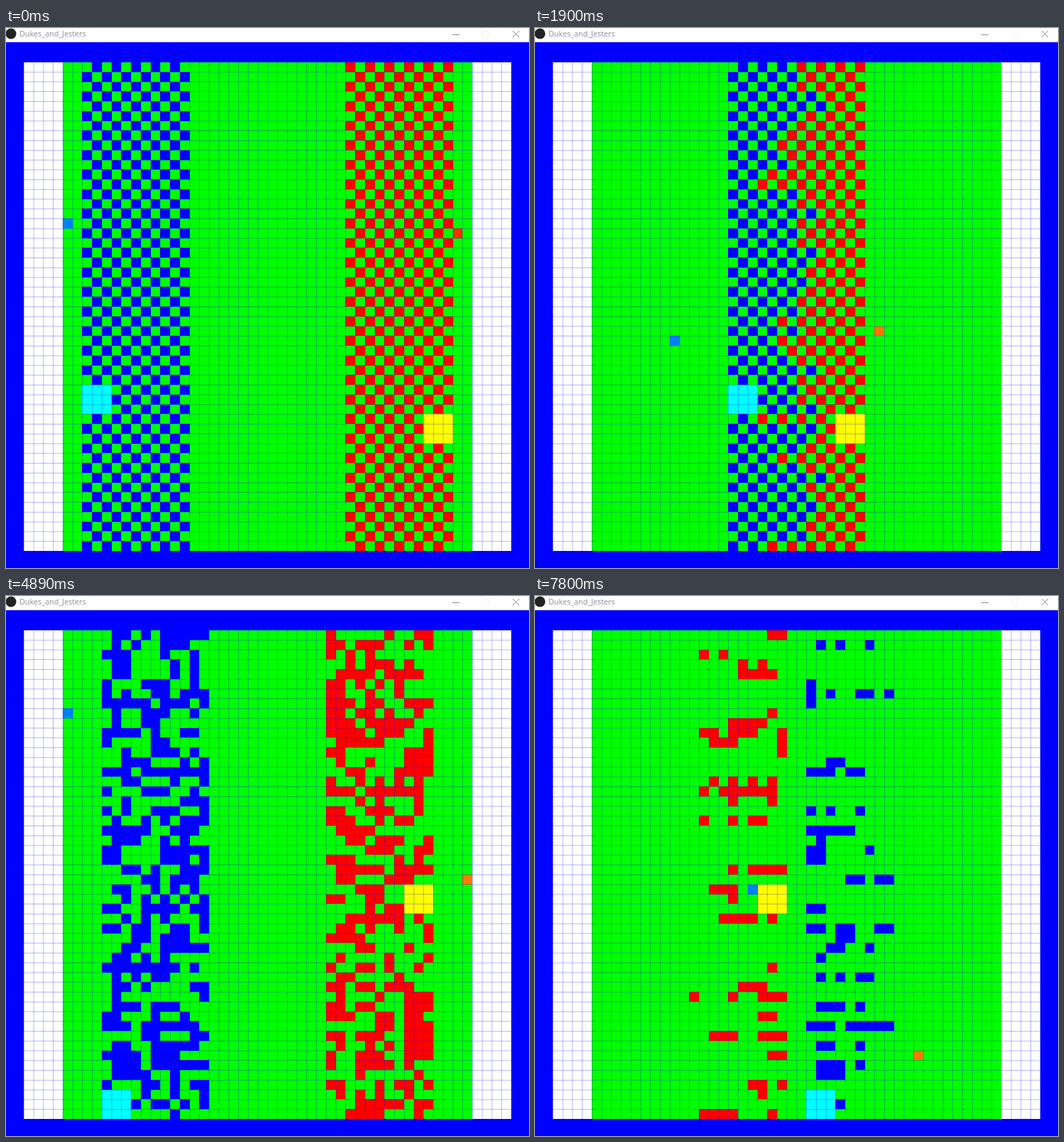
Animation, 737 px wide and 760 px high, one loop 8000 ms. Source, as an HTML page with a canvas:

```html
<!DOCTYPE html>
<html lang="en">
<head>
<meta charset="utf-8">
<style>
html, body { margin: 0; width: 100%; height: 100%; overflow: hidden; background: #fff; }
canvas { display: block; }
</style>
</head>
<body>
<canvas width="737" height="760"></canvas>
<script>
const ctx = document.querySelector('canvas').getContext('2d');
const SIZE = 50, RANKS = 11, LAST_STEP = 20;
const LOOP = 8000, STEP = 166, SECOND_START = 4890;

let seed = 4177;
const random = () => (seed = (seed * 1664525 + 1013904223) % 4294967296) / 4294967296;
const coin = () => random() < 0.5;
const checker = (col, row) => (col + row) % 2;

function soldiers(row, start, dir, placed) {
  const units = [];
  for (let col = start; col < start + RANKS; col++)
    if (placed(col, row)) units.push({ row, col, dir, end: Infinity });
  return units;
}

// When the two front soldiers of a row meet, a coin decides who falls.
function fightRow(row, placed) {
  const blue = soldiers(row, 6, 1, placed).reverse();
  const red = soldiers(row, 33, -1, placed);
  let b = 0, r = 0;
  while (b < blue.length && r < red.length) {
    const meet = Math.ceil((red[r].col - blue[b].col) / 2);
    const loser = coin() ? blue[b++] : red[r++];
    loser.end = meet;
  }
  return [...blue, ...red];
}

function createBattle(placed, setup) {
  const units = [];
  for (let row = 0; row < SIZE; row++) units.push(...fightRow(row, placed));
  return { units, ...setup };
}

const battles = [
  createBattle(checker, {
    origin: -96, blueKing: 33, redKing: 36, blueKnight: 16, redKnight: 16, redTurn: 45
  }),
  createBattle(coin, {
    origin: 4480, blueKing: 47, redKing: 26, blueKnight: 6, redKnight: 24, redTurn: 57
  })
];

const colX = col => 25 + col * 13.74;
const rowY = row => 48 + row * 13.76;

function block(col, row, color, w = 1, h = w) {
  const x = Math.round(colX(col)), y = Math.round(rowY(row));
  ctx.fillStyle = color;
  ctx.fillRect(x, y, Math.round(colX(col + w)) - x, Math.round(rowY(row + h)) - y);
}

function line(color, x1, y1, x2, y2) {
  ctx.strokeStyle = color;
  ctx.beginPath();
  ctx.moveTo(x1, y1);
  ctx.lineTo(x2, y2);
  ctx.stroke();
}

function drawWindow() {
  ctx.fillStyle = '#fff';
  ctx.fillRect(0, 0, 737, 20);
  ctx.fillStyle = '#222';
  ctx.beginPath();
  ctx.arc(7, 8, 7.5, 0, 7);
  ctx.fill();
  ctx.fillStyle = '#8c8c9c';
  ctx.font = '10.8px "Open Sans", "Noto Sans", sans-serif';
  ctx.fillText('Dukes_and_Jesters', 19, 12);
  line('#888', 629, 9.5, 639, 9.5);
  line('#888', 714, 4, 723, 13);
  line('#888', 723, 4, 714, 13);
  ctx.strokeStyle = '#f6f3e6';
  ctx.strokeRect(671.5, 4.5, 8, 8);
  ctx.fillStyle = '#00f';
  ctx.fillRect(0, 20, 737, 740);
  block(0, 0, '#fff', SIZE);
  block(4, 0, '#0f0', 42, SIZE);
}

// Lines thinner than a pixel, so their strength varies across the board.
function drawGrid() {
  ctx.fillStyle = 'rgba(0, 0, 255, 0.4)';
  for (let i = 0; i <= SIZE; i++) {
    ctx.fillRect(colX(i), 48, 0.7, 688);
    ctx.fillRect(25, rowY(i), 687, 0.7);
  }
}

function drawBattle(battle, step, warmth) {
  for (const u of battle.units)
    if (step < u.end) block(u.col + u.dir * step, u.row, u.dir > 0 ? '#00f' : '#f00');
  block(6 + step, battle.blueKing, '#0ff', 3);
  block(41 - step, battle.redKing, '#ff0', 3);
  block(Math.max(4, step), battle.blueKnight + step, '#0080ff');

  // The red knight falls on reaching the blue front line.
  const col = Math.min(45, battle.redTurn - Math.max(1, step));
  if (col > 16 + step)
    block(col, battle.redKnight + Math.abs(step - 1), `rgb(255, ${warmth}, 0)`);
}

function draw(time) {
  const second = time >= SECOND_START;
  const battle = battles[+second];
  const step = Math.min(LAST_STEP, Math.floor((time - battle.origin) / STEP));
  drawWindow();
  drawBattle(battle, step, second ? 120 : 45 + step * 6);
  drawGrid();
}

const start = performance.now();
function frame() {
  draw((performance.now() - start) % LOOP);
  requestAnimationFrame(frame);
}
frame();
</script>
</body>
</html>
```
